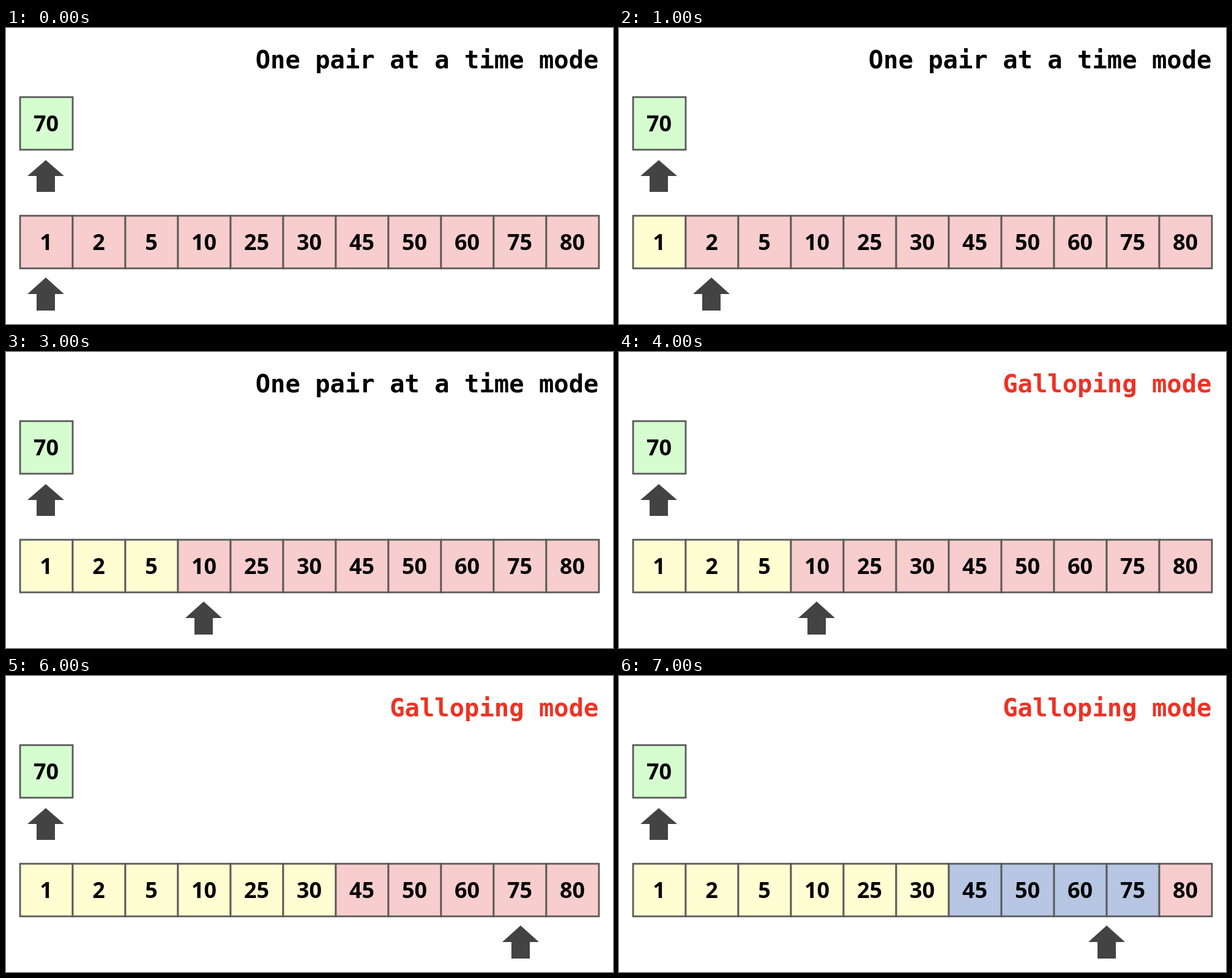
These frames come from a looping animation (992 px wide and 484 px high, 8 s). An HTML page with a canvas:

```html
<!DOCTYPE html>
<html lang="en">
<head>
<meta charset="utf-8">
<title>Merge modes</title>
<style>
html, body { margin: 0; width: 100%; height: 100%; overflow: hidden; background: #fff; }
canvas { display: block; }
</style>
</head>
<body>
<canvas id="stage" width="992" height="484"></canvas>
<script>
const ctx = document.getElementById('stage').getContext('2d');
const STEP = 1000, LEFT = 23, CELL = 86;
const GREEN = '#d5fdd0', PINK = '#f7cdcd', YELLOW = '#fffed3', BLUE = '#b6c6e3';
const values = [1, 2, 5, 10, 25, 30, 45, 50, 60, 75, 80];
const single = { text: 'One pair at a time mode', color: '#000' };
const gallop = { text: 'Galloping mode', color: '#ee3224' };

// merged: yellow cells from the left; searched: blue cells after them
const steps = [
  { title: single, merged: 0, searched: 0, arrow: 65 },
  { title: single, merged: 1, searched: 0, arrow: 151 },
  { title: single, merged: 2, searched: 0, arrow: 237 },
  { title: single, merged: 3, searched: 0, arrow: 323 },
  { title: gallop, merged: 3, searched: 0, arrow: 323 },
  { title: gallop, merged: 4, searched: 0, arrow: 495 },
  { title: gallop, merged: 6, searched: 0, arrow: 841 },
  { title: gallop, merged: 6, searched: 4, arrow: 797 }
];

function drawCell(index, top, value, fill) {
  const x = LEFT + index * CELL;
  ctx.fillStyle = fill;
  ctx.fillRect(x, top, CELL, CELL);
  ctx.strokeStyle = '#595959';
  ctx.lineWidth = 2.8;
  ctx.strokeRect(x, top, CELL, CELL);
  ctx.fillStyle = '#000';
  ctx.font = 'bold 36px "Noto Sans", "Open Sans", sans-serif';
  ctx.textAlign = 'center';
  ctx.fillText(value, x + CELL / 2 - 0.5, top + 56);
}

function drawArrow(x, top, height) {
  const neck = top + height / 2, bottom = top + height;
  ctx.fillStyle = '#434343';
  ctx.beginPath();
  ctx.moveTo(x, top);
  ctx.lineTo(x + 30, neck);
  ctx.lineTo(x + 15, neck);
  ctx.lineTo(x + 15, bottom);
  ctx.lineTo(x - 15, bottom);
  ctx.lineTo(x - 15, neck);
  ctx.lineTo(x - 30, neck);
  ctx.fill();
}

function draw({ title, merged, searched, arrow }) {
  ctx.fillStyle = '#fff';
  ctx.fillRect(0, 0, 992, 484);

  ctx.fillStyle = title.color;
  ctx.font = 'bold 40.5px "DejaVu Sans Mono", monospace';
  ctx.textAlign = 'right';
  ctx.fillText(title.text, 968.5, 65.5);

  drawCell(0, 113, 70, GREEN);
  drawArrow(65, 216, 52);

  values.forEach((value, i) => {
    const fill = i < merged ? YELLOW : i < merged + searched ? BLUE : PINK;
    drawCell(i, 307, value, fill);
  });
  drawArrow(arrow, 408, 54);
}

function frame() {
  draw(steps[Math.floor(performance.now() / STEP) % steps.length]);
  requestAnimationFrame(frame);
}
frame();
</script>
</body>
</html>
```
